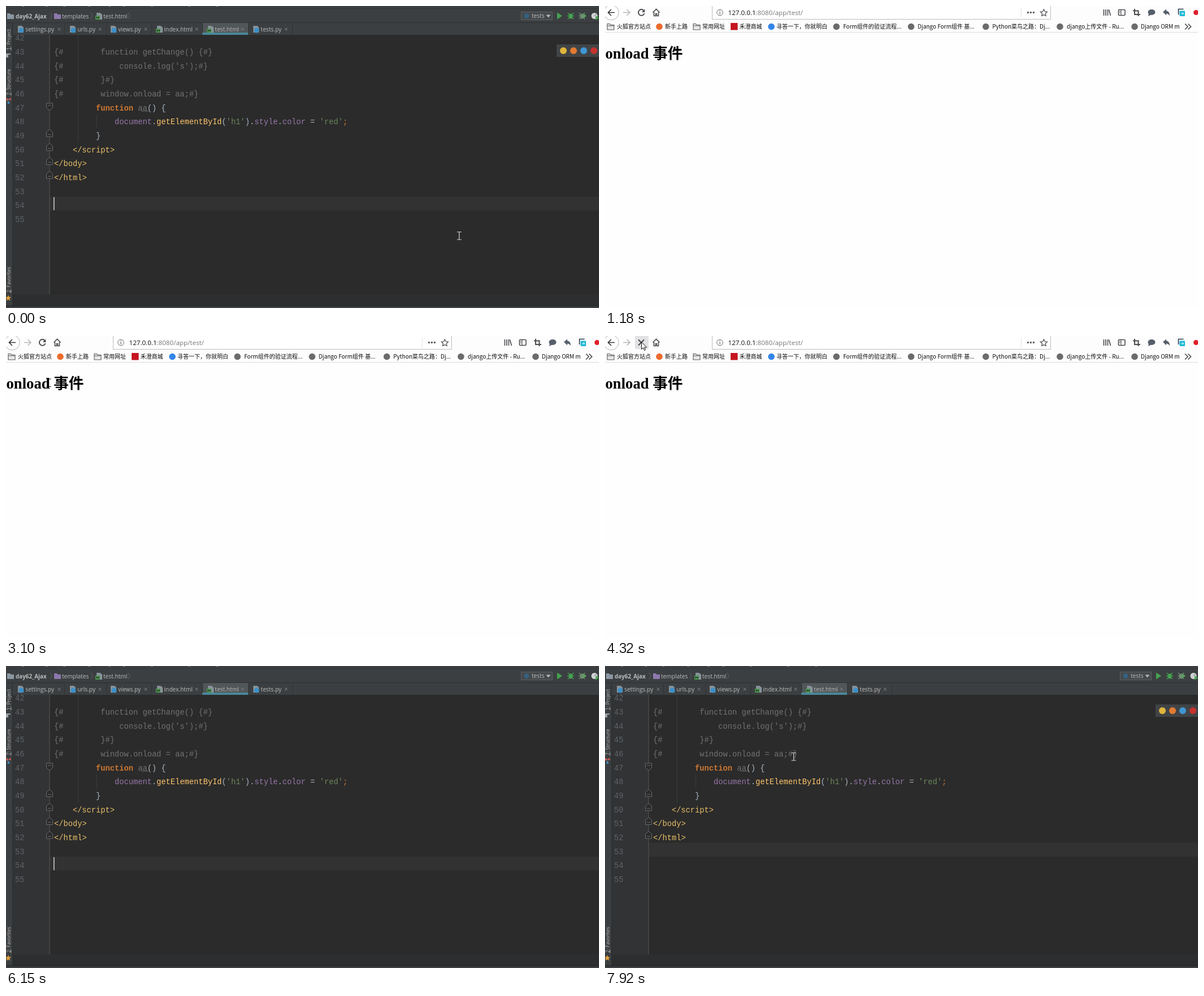
An HTML page for the animation above (8 s loop, 1048x534 px).

```html
<!DOCTYPE html>
<html lang="zh">
<head>
<meta charset="utf-8">
<title>onload</title>
<style>
  html, body { margin: 0; width: 100%; height: 100%; overflow: hidden; background: #2b2b2b; }
  svg { display: block; width: 1048px; height: 534px; }
  text { white-space: pre; }
  .ui { font: 10.2px "Open Sans", "Noto Sans", sans-serif; fill: #bbb; }
  .code { font: 13.72px "Liberation Mono", monospace; fill: #a9b7c6; }
  .url { font: 11.6px "Open Sans", "Noto Sans", sans-serif; }
  .mark { font: 10px "Noto Sans CJK SC", "Noto Sans CJK", sans-serif; fill: #0c0c0d; }
  .head { font: bold 26.67px "Liberation Serif", "Noto Sans CJK SC", "Noto Sans CJK", serif; fill: #000; }
  .line { fill: none; stroke: #4a4a4f; stroke-width: 1.6; }
</style>
</head>
<body>
<svg id="stage" viewBox="0 0 1048 534"></svg>
<script>
const LOOP = 8000, ROW = 24.67, COL = 8.23;
const rowTop = n => 337 + (n - 54) * ROW;
const baseline = n => 86 + (n - 43) * ROW;

const rect = (x, y, w, h, fill, more = '') =>
  `<rect x="${x}" y="${y}" width="${w}" height="${h}" fill="${fill}" ${more}/>`;
const dot = (x, y, r, fill, more = '') => `<circle cx="${x}" cy="${y}" r="${r}" fill="${fill}" ${more}/>`;
const path = (d, more = '') => `<path d="${d}" ${more}/>`;
const text = (cls, x, y, str, more = '') => `<text class="${cls}" x="${x}" y="${y}" ${more}>${str}</text>`;
const group = (id, body, more = '') => `<g id="${id}" ${more}>${body}</g>`;

// ---------- editor ----------
const GREY = '#727272', PLAIN = '#a9b7c6', ORANGE = '#cc7832', PURPLE = '#9876aa',
      GREEN = '#6a8759', YELLOW = '#ffc66d', TAG = '#e8bf6a';

const source = [
  [43, 0, ['{#        function getChange() {#}', GREY]],
  [44, 0, ["{#            console.log('s');#}", GREY]],
  [45, 0, ['{#        }#}', GREY]],
  [46, 0, ['{#        window.onload = aa;#}', GREY]],
  [47, 9, ['function', ORANGE, 'bold'], [' aa', GREY], ['() {', PLAIN]],
  [48, 13, ['document', PURPLE], ['.', PLAIN], ['getElementById', YELLOW], ['(', PLAIN], ["'h1'", GREEN],
    [').', PLAIN], ['style', PURPLE], ['.', PLAIN], ['color', PURPLE], [' = ', PLAIN], ["'red'", GREEN], [';', ORANGE]],
  [49, 9, ['}', PLAIN]],
  [50, 4, ['&lt;/script&gt;', TAG]],
  [51, 0, ['&lt;/body&gt;', TAG]],
  [52, 0, ['&lt;/html&gt;', TAG]],
];
const codeLine = ([n, col, ...parts]) => text('code', 85 + col * COL, baseline(n),
  parts.map(([s, fill, weight = 'normal']) => `<tspan fill="${fill}" font-weight="${weight}">${s}</tspan>`).join(''));

const foldMark = (n, dir) => {
  const y = rowTop(n) + 12.5;
  return path(`M71.5 ${y - 5 * dir}h11v${8 * dir}l-5.5 ${5 * dir}l-5.5 ${-5 * dir}zM74 ${y - dir}h6`,
    'fill="#2b2b2b" stroke="#696b6d"');
};
const pyIcon = (x, y) => path(`M${x - 5} ${y - 6}h7l3 3v9h-10z`, 'fill="#87939a"') + dot(x + 1, y + 2, 4.5, '#3d8fc6');
const htmlIcon = (x, y) => path(`M${x - 4} ${y - 6}h6l4 3v9h-10z`, 'fill="#87939a"') +
  rect(x - 6, y - 1, 8, 7, '#4f9a52') + path(`M${x - 4} ${y + .5}v4M${x} ${y + .5}v4M${x - 4} ${y + 2.5}h4`, 'stroke="#222"');
const folder = (x, y, fill) => path(`M${x - 6} ${y - 5}h5l1.5 2h5.5v8h-12z`, `fill="${fill}"`);
const chevron = x => path(`M${x} 12l3 5.5l-3 5.5`, 'fill="none" stroke="#606366"');

const tabs = [
  [26, 'settings.py', 94, 103], [118, 'urls.py', 166, 177], [190, 'views.py', 247, 257],
  [271, 'index.html', 337, 347], [361, 'test.html', 418, 428], [442, 'tests.py', 495, 506],
];
const tab = ([x, name, close, end]) =>
  (name.endsWith('py') ? pyIcon : htmlIcon)(x, 41) + text('ui', x + 8.3, 45, name) +
  path(`M${close - 2.5} 38.5l5 5m0 -5l-5 5`, 'stroke="#808386"') + rect(end, 31, 1, 20, '#2f3133');

const sideLabel = (y, key, name) =>
  text('ui', 0, 0, `<tspan text-decoration="underline">${key}</tspan>: ${name}`,
    `transform="translate(7.5 ${y}) rotate(-90)" style="font-size:8.6px"`);

const bug = (x, fill) =>
  path(`M${x - 5} 12l10 11m0 -11l-10 11M${x - 6} 17.5h12`, `stroke="${fill}" stroke-width="1.3"`) +
  `<ellipse cx="${x}" cy="18" rx="3.2" ry="4.5" fill="${fill}"/>`;

const editor = [
  rect(0, 0, 1048, 534, '#3c3f41'),
  ...[28, 70, 101, 145, 181, 207, 256, 322, 371].map(x => rect(x, 0, 4, 1, '#8a8c8e')),
  rect(0, 4, 1048, 1, '#333537'), rect(0, 29, 1048, 1, '#2d2f30'),
  folder(8, 18, '#8b98a3'), text('ui', 17, 21.5, 'day62_Ajax', 'style="font-weight:bold;font-size:9.9px"'), chevron(78),
  folder(91, 18, '#8d78ae'), text('ui', 99, 21.5, 'templates'), chevron(150),
  htmlIcon(164, 18), text('ui', 172, 21.5, 'test.html'), chevron(216),
  rect(910.5, 10.5, 55, 14, '#45494b', 'stroke="#5e6163"'), dot(920, 17.5, 4.5, '#34617f'),
  text('ui', 929, 21, 'tests'), path('M954.5 15.5h8l-4 5z', 'fill="#b5b7b9"'),
  path('M974 11.5l9 6l-9 6z', 'fill="#45a351"'), bug(998, '#45a351'),
  bug(1018, '#6f8d72'), path('M1020 13l6 4.5l-6 4.5z', 'fill="#57a35f"'),
  dot(1040, 17.5, 5.5, '#d0d2d3'), path('M1040 17.5l3 -3', 'stroke="#555"'), path('M1042 17l6 4l-6 4z', 'fill="#45a351"'),
  rect(347, 30, 81, 21, '#515658'), tabs.map(tab).join(''),
  rect(347, 47, 81, 4, '#4a8799'),
  rect(12, 51, 1036, 479, '#2b2b2b'), rect(12, 51, 65, 459, '#313335'),
  rect(12, 510, 1036, 20, '#2d2e2f'), rect(11, 30, 1, 500, '#2b2d2e'),
  rect(0, 529.5, 1048, 1.5, '#252728'),
  sideLabel(78, 1, 'Project'), sideLabel(158, 7, 'Structure'), sideLabel(507, 2, 'Favorites'),
  rect(0, 84, 8, 2, '#9da3a8'), rect(0, 86, 4, 5, '#9da3a8'),
  path('M2 165l6 0M2 165l3 6', 'stroke="#888"'), dot(1.5, 165, 2, '#c75450'), dot(7, 165, 2, '#c75450'), dot(4.5, 171, 2, '#3d8fc6'),
  path('M4 511l1.5 3.5l3.7 .3l-2.8 2.5l.9 3.7l-3.3 -2l-3.3 2l.9 -3.7l-2.8 -2.5l3.7 -.3z', 'fill="#e0a03c"'),
  group('rowBar', rect(77, 0, 971, ROW, '#323232')),
  rect(76.5, 51, 1, 459, '#555759'),
  path('M127.5 51V241M160.5 192V216', 'stroke="#393b3c"'),
  '<g clip-path="url(#below)">',
  Array.from({ length: 14 }, (_, i) => text('code', 16, baseline(42 + i), 42 + i, 'style="fill:#606366"')).join(''),
  source.map(codeLine).join(''), '</g>',
  path('M239 187' + 'l2 -2l2 2'.repeat(4), 'fill="none" stroke="#727272" stroke-width=".8"'),
  foldMark(47, 1), [49, 50, 51, 52].map(n => foldMark(n, -1)).join(''),
  group('caret', rect(84, 1, 1.6, 23, '#c8c8c8')),
  group('popup', rect(973, 68, 75, 22, '#414446') +
    ['#dfb53c', '#e27b32', '#3f97d3', '#c7332f'].map((c, i) => dot(985 + i * 18, 79, 6, c)).join('')),
].join('');

// ---------- browser ----------
const outlineFolder = x => path(`M${x - 6} 31.5h4.5l1.5 2h6v8.5h-12zM${x - 6} 35h12`,
  'fill="#e8e8e8" stroke="#5b5b5f" stroke-width="1.1"');
const bookmarks = [
  [10, 21, '火狐官方站点', 'folder'], [96, 106, '新手上路', '#ec6b2d'], [162, 172, '常用网址', 'folder'],
  [228, 237.5, '禾澄商城', 'square'], [294, 303, '寻答一下，你就明白', '#3385e8'],
  [409, 421, 'Form组件的验证流程...'], [541, 552.5, 'Django Form组件 基...'],
  [673, 684.5, 'Python菜鸟之路：Dj...'], [804, 816, 'django上传文件 - Ru...'], [936, 947, 'Django ORM m'],
];
const bookmark = ([ix, x, name, icon = '#6b6b6b']) =>
  (icon === 'folder' ? outlineFolder(ix) : icon === 'square' ? rect(222, 30, 12.5, 12.5, '#c5141f')
    : dot(ix, 36.5, 5.8, icon)) + text('mark', x, 40.3, name);

const browser = [
  rect(0, 0, 1048, 534, '#fefefe'), rect(0, 0, 1048, 46, '#fdfdfd'), rect(0, 46, 1048, 1, '#dcdcde'),
  rect(1, 28, 82, 21, '#e2e2e4', 'id="markHover" rx="2"'),
  rect(53, -2, 24, 25, '#e2e2e4', 'id="reloadHover" rx="2"'),
  dot(11, 11.5, 13.3, '#fff', 'stroke="#b4b4b6"'),
  path('M17 11.5H5.5M11 6l-5.5 5.5l5.5 5.5', 'class="line" style="stroke:#333"'),
  path('M32 11.5h12M38.5 6l5.5 5.5l-5.5 5.5', 'class="line" style="stroke:#b8b8ba"'),
  group('reload', path('M68.5 8A5.4 5.4 0 1 0 69.5 13', 'class="line" style="stroke-width:1.9"') +
    path('M70.3 5.5v5.5h-5.5z', 'fill="#4a4a4f"')),
  group('stop', path('M59 6.5l10 10m0 -10l-10 10', 'class="line" style="stroke-width:2"')),
  path('M84.5 11.5l6 -6l6 6M86.5 11v6.5h3v-4h2v4h3V11', 'class="line"'),
  rect(189.5, -3, 598, 26.5, '#fff', 'stroke="#bcbcbe"'),
  dot(203, 11.5, 5.3, 'none', 'stroke="#6b6b6f"'), rect(202.4, 10.5, 1.3, 4, '#6b6b6f'), rect(202.4, 8, 1.3, 1.4, '#6b6b6f'),
  text('url', 217.5, 15.7, '127.0.0.1<tspan fill="#77777b">:8080/app/test/</tspan>', 'fill="#0c0c0d"'),
  rect(735, 3, 1, 17, '#e4e4e6'),
  [747.5, 752.5, 757.5].map(x => dot(x, 11.5, 1.7, '#5a5a5f')).join(''),
  path('M775.5 6l1.8 3.8l4.2 .5l-3.1 2.9l.8 4.2l-3.7 -2l-3.7 2l.8 -4.2l-3.1 -2.9l4.2 -.5z', 'class="line" style="stroke-width:1.2"'),
  path('M881.5 6v11M885 6v11M888.5 6v11M890.5 6.5l3 10.5', 'class="line"'),
  rect(907.5, 6.5, 11.5, 10, 'none', 'rx="1.5" stroke="#4a4a4f" stroke-width="1.6"'),
  path('M912 7v9M909 9.5h2M909 12h2', 'class="line" style="stroke-width:1.1"'),
  path('M936 5v10h10M933 8.5h9.5v9.5', 'class="line" style="stroke-width:2"'),
  '<ellipse cx="966" cy="11" rx="6.5" ry="5" fill="#565e6b"/>', path('M961 13l-1 5l6 -3z', 'fill="#565e6b"'),
  path('M986 10.5l6 -5v3q6 .5 6 9q-2 -4 -6 -4v3z', 'fill="#565e6b"'),
  path('M1013.5 15v-9.5h9', 'class="line" style="stroke:#263b4e"'), rect(1015.5, 8.5, 9.5, 9.5, '#1fbad6', 'rx="1"'),
  path('M1018 13.2h4.5m-2 -2l2 2l-2 2', 'fill="none" stroke="#fff"'),
  dot(1044.5, 11.5, 4.5, '#e0212b'),
  bookmarks.map(bookmark).join(''), rect(1019, 29, 29, 16, '#fdfdfd'),
  path('M1025 31.5l5 5l-5 5M1030.5 31.5l5 5l-5 5', 'class="line"'),
  text('head', .5, 93, 'onload 事件'),
].join('');

const beam = path('M-4 -6.5h3q1 0 1 1q0 -1 1 -1h3M0 -6V6.5M-4 7h3q1 0 1 -1q0 1 1 1h3', 'fill="none" stroke-width="1.2"');
const arrow = path('M.5 .5v13l3 -2.8l2 4.8l2 -.9l-2 -4.6h4z', 'fill="#fff" stroke="#000" stroke-width=".9"');

const stage = document.getElementById('stage');
stage.innerHTML = '<clipPath id="below"><rect x="12" y="51" width="1036" height="459"/></clipPath>' +
  group('editor', editor) + group('browser', browser) + group('beam', beam) + group('arrow', arrow);

// ---------- timeline: rows take effect at their time and hold ----------
const pointer = [
  [0, 'beam', 801, 406], [130, 'beam', 718, 470], [270, 'beam', 590, 440], [390, 'beam', 500, 400],
  [790, 'beam', 424, 328], [910, 'beam', 360, 56], [1030],
  [1680, 'arrow', 333, 392], [1830, 'arrow', 202, 142], [2540, 'arrow', 130, 106], [2670, 'beam', 92, 93],
  [2820, 'beam', 82, 89], [2950, 'beam', 75.5, 85], [3100, 'beam', 75.5, 82.5], [3250, 'beam', 83, 77],
  [3370, 'arrow', 92, 63], [3490, 'arrow', 98, 67], [3770, 'arrow', 70, 30], [3920, 'arrow', 66, 16],
  [4040, 'arrow', 64, 10], [4450, 'arrow', 90, 32], [4590, 'arrow', 212, 126], [4740, 'arrow', 240, 146],
  [4860, 'arrow', 277, 168], [5000, 'arrow', 300, 184], [5130, 'arrow', 331, 205], [5280, 'arrow', 420, 260], [5400],
  [6560, 'beam', 433, 482], [6710, 'beam', 395, 380], [6830, 'beam', 368, 315], [6980, 'beam', 343, 280],
  [7100, 'beam', 271, 182], [7250, 'beam', 190, 170], [7400, 'beam', 189, 168], [7790, 'beam', 262, 164],
  [7920, 'beam', 333.5, 160],
];
const caretOn = [[0, 1], [270, 0], [790, 1], [1030, 0], [6150, 1], [6710, 0], [6830, 1], [7400, 0]];
const caretRow = [[0, 54], [6830, 53]];
const popupAlpha = [[0, 1], [910, .5], [1030, 0], [6980, .2], [7100, .45], [7250, .75], [7400, 1]];
const loading = [[0, 'reload', 1], [4320, 'stop', 1], [4860, 'reload', .45], [5400, 'reload', 1]];

const at = (table, t) => table.findLast(row => row[0] <= t).slice(1);
const el = id => document.getElementById(id);
const show = (id, on) => { el(id).style.display = on ? '' : 'none'; };
const move = (id, x, y) => el(id).setAttribute('transform', `translate(${x} ${y})`);

function draw(t) {
  const inBrowser = t >= 1180 && t < 6150;
  show('browser', inBrowser);
  show('editor', !inBrowser);

  const [row] = at(caretRow, t);
  move('rowBar', 0, rowTop(row));
  move('caret', 0, rowTop(row));
  show('caret', at(caretOn, t)[0]);
  el('popup').style.opacity = at(popupAlpha, t)[0];

  show('markHover', t >= 3770 && t < 3920);
  show('reloadHover', t >= 3920 && t < 4590);
  const [icon, alpha] = at(loading, t);
  show('reload', icon === 'reload');
  show('stop', icon === 'stop');
  el('reload').style.opacity = alpha;

  const [kind, x, y] = at(pointer, t);
  show('beam', kind === 'beam');
  show('arrow', kind === 'arrow');
  if (kind) move(kind, x, y);
  el('beam').style.stroke = inBrowser ? '#000' : '#d4d4d4';
}

const start = performance.now();
function tick() {
  draw((performance.now() - start) % LOOP);
  requestAnimationFrame(tick);
}
tick();
</script>
</body>
</html>
```
